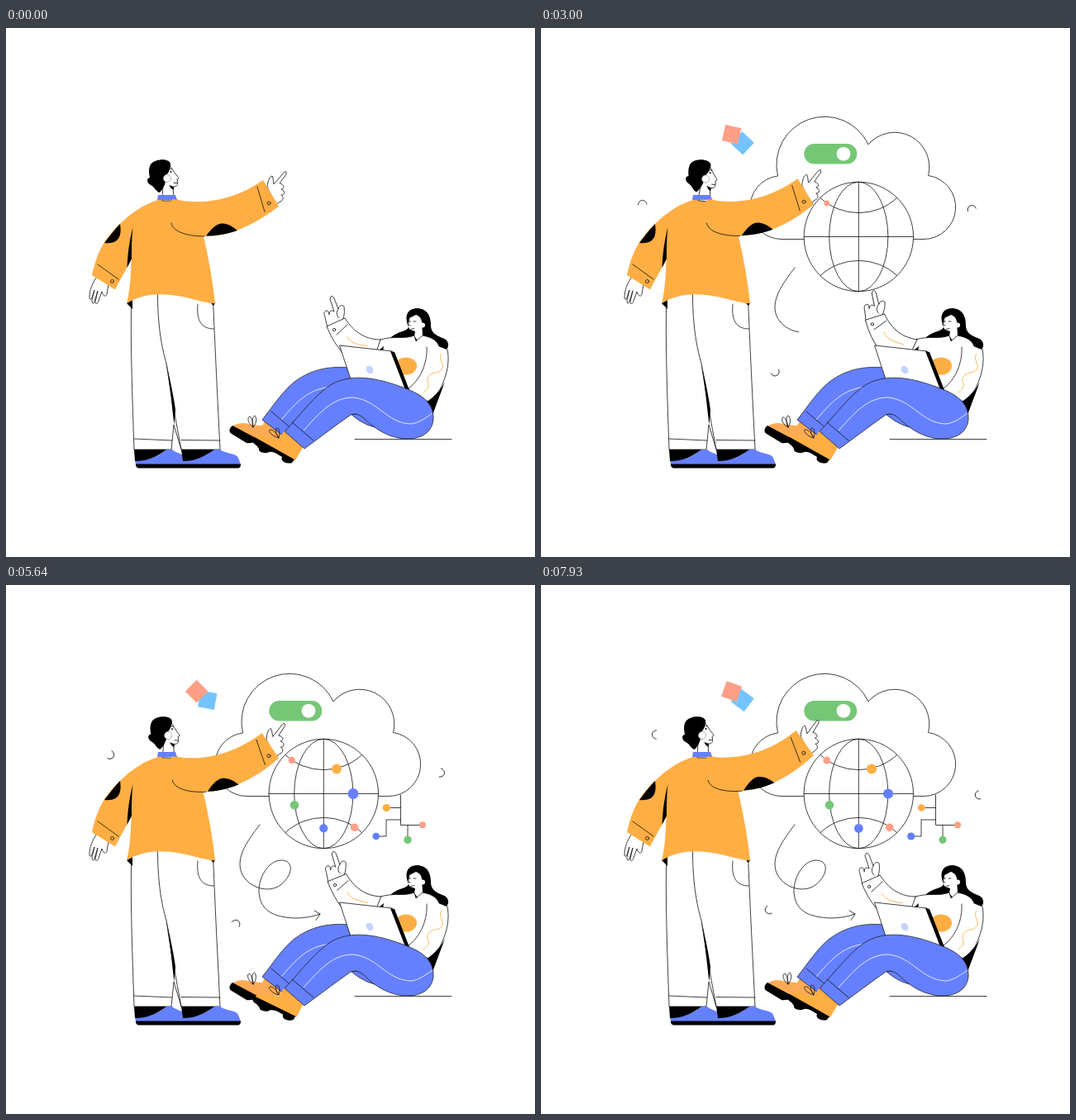
Animation of 640 by 640 pixels, one loop 8 s. Source, as an HTML page:

```html
<!DOCTYPE html>
<html lang="en">
<head>
<meta charset="utf-8">
<title>Cloud teamwork</title>
<style>
html, body { margin: 0; width: 100%; height: 100%; overflow: hidden; background: #fff; }
svg { display: block; width: 100%; height: 100%; }
.line { fill: none; stroke: #111; stroke-width: .8; stroke-linecap: round; stroke-linejoin: round; }
.skin { fill: #fff; stroke: #111; stroke-width: .8; stroke-linejoin: round; }
.orange { fill: #ffae43; }
.peach { fill: #ffab55; }
.blue { fill: #6580ff; }
.jeans { fill: #6580ff; stroke: #111; stroke-width: .7; }
.white { fill: none; stroke: #fff; stroke-width: .8; }
.thread { fill: none; stroke: #ffae43; stroke-width: .9; }
.draw { stroke-dasharray: 1 2; }
</style>
</head>
<body>
<svg viewBox="0 0 640 640">
  <g id="cloud">
    <path class="skin" d="M291 255.5A38.4 38.4 0 0 1 286.5 179A58.25 58.25 0 0 1 396 141A41.9 41.9 0 0 1 468.5 178.5A38.7 38.7 0 0 1 463 255.5Z"/>
  </g>
  <g id="toggle">
    <rect id="track" x="318.3" y="140" width="64" height="24.5" rx="12.25"/>
    <circle id="knob" cy="152.3" r="8.4" fill="#fff"/>
  </g>
  <g id="network"></g>
  <g id="globe">
    <circle class="skin" cx="384.3" cy="252.5" r="66.2"/>
    <path class="line" d="M384.3 186.3V318.7M318.1 252.5H450.5M338 205.5A67.8 67.8 0 0 0 430.6 205.5M338 299.5A67.8 67.8 0 0 1 430.6 299.5"/>
    <ellipse class="line" cx="384.3" cy="252.5" rx="35.6" ry="66.2"/>
  </g>
  <g id="dots"></g>
  <g id="squiggle"></g>
  <g id="rings"></g>
  <rect id="skySquare" x="-10" y="-10" width="20" height="20" fill="#74c4ff"/>
  <rect id="pinkSquare" x="-9.8" y="-9.8" width="19.6" height="19.6" fill="#ff9f88"/>

  <g id="man">
    <path class="skin" d="M152 316C150 380 153 450 155 510H200L203 480 212 510H259C256 450 253 390 250 316Z"/>
    <path class="line" d="M183.5 315C183 358 188 385 194 406C199 440 206 478 212 510M155 497L201 499M212 498.5L259 499M232 334C230 355 237 364 251.5 364"/>
    <path d="M194 404C198 425 203 445 205 462L203.5 480C201 460 198 430 194 404ZM146 333L153 329V340ZM248 333L253.5 332 251 336Z"/>
    <path class="blue" d="M156 523C172 524 185 518 194 510H201C207 515 214 515 220 520V528H157ZM213 523C230 524 242 518 251 510H259C268 516 278 514 281 520L284 528H213Z"/>
    <path d="M155 510H194C184 518 172 524 156 524ZM212 510H252C241 518 230 524 214 524ZM157 527.5H284C284 531 283 532.5 280 532.5H162C158 532.5 157 531 157 527.5Z"/>
    <path class="skin" d="M110 301C104 309 101 318 101 326C101 329 103 329 104 326L107 317 104 329C104 334 106 334 107 331L111 318 108 331C108 335 111 334 112 330L116 319C117 324 121 326 122 322L124 310Z"/>
    <path class="orange" d="M184 208L206 207 222 212C233 228 237 242 239 252C245 278 250 305 253 333.5C236 332 220 325 200 323C180 321 163 323 146 333C150 318 151 299 151.5 281C145 292 139 303 132 316.5L104 299C110 270 121 252 139 236C150 225 165 214 184 208Z"/>
    <path d="M153.5 241C149 258 147 275 146.5 290L152 279C152 265 152 255 153.5 241ZM138 237C140 250 138 262 119 260C126 251 132 243 138 237Z"/>
    <path class="line" d="M111 286L136 304"/><circle class="line" cx="128.5" cy="306.5" r="2"/>
    <g id="manHead">
      <path class="skin" d="M189 209L190 188 197 165C201 170 203 174 207 179Q210.500 182 207 183L207.500 187C208 191 205 192.500 202 192L203 209Z"/>
      <path d="M199 164C197 157 180 158 175 165C172 170 173 176 174 181C169 182 171 188 175 190C180 192 181 198 186 199C190 195 192 190 193 186L192 178C196 178 198 172 199 167ZM197 190L203 192 202.500 196Q199 194 197 190Z"/>
      <circle cx="195" cy="182" r="4.600" fill="#fff" stroke="#999" stroke-width=".7"/>
      <path class="line" d="M203 187.500H207M197.500 171Q199.500 169.500 201 171"/>
      <circle cx="199.500" cy="174" r="1"/>
    </g>
    <path class="blue" d="M184 202H205L207 208H183Z"/>
    <g id="manArm">
      <path class="skin" d="M316 192C317 184 319 180 322 179C324 183 323 186 324 189L336 175Q340 171.5 339 177L331 188C336 189 338 194 333 195C338 197 338 202 333 202C336 205 336 208 332 210L326 214Z"/>
      <path class="orange" d="M202 207C236 215 275 209 311 184L330 215.5C303 237 272 252 240 252C215 251 202 247 200 236L195 215Z"/>
      <path class="line" d="M200 236C202 247 220 252 240 252M304 192L313 222.5"/>
      <path d="M242 251.5C250 241 256 236 262 236.5C270 237 275 241 280 245C268 249 256 252 242 251.5Z"/>
      <circle class="line" cx="318" cy="212" r="2"/>
    </g>
  </g>

  <g id="woman">
    <path class="line" d="M422 497.5H539"/>
    <path d="M464 376C474 366 484 368 487 362C482 350 484 339 498 339C512 340 514 352 514 360C514 368 520 372 528 375C538 378 536 389 531 389L516 388 500 378Z"/>
    <path fill="#fff" d="M488 351C486 356 486 362 489 365L495 367 494 373 499 379 504 372 503 355C502 350 499 348 496 347Z"/>
    <path class="line" d="M488 351L486.5 359 489 360M490 364.5L494 363.5M487 355H489.5M493 355H496"/>
    <circle cx="504" cy="359.5" r="3" fill="#fff"/>
    <path class="skin" d="M446 392L453 377C470 372 481 377 494 372L496 379 504 372C514 374 521 377 524 385L534 389C538 410 530 432 516 452L500 450 450 410Z"/>
    <path d="M531 428L516 468 507 454C518 446 526 438 531 428ZM450 391L457 385 456 392Z"/>
    <path class="line" d="M509 386C510 405 502 425 487 436"/>
    <path class="thread" d="M527 394C521 402 535 408 524 416C510 418 508 424 511 430C512 436 508 438 505 441"/>
    <ellipse class="orange" cx="484" cy="409" rx="13" ry="10.5"/>
    <g id="womanArm">
      <path class="skin" d="M389 363L386 350C384 345 385 342 388 342C390 342 391 344 391 347C391 342 394 341 397 343L392 328Q393 321 397 327L402 340C403 336 407 334 409 337C410 345 409 349 407 354Z"/>
      <path class="line" d="M402 340C399 344 400 349 403 351"/>
      <path fill="#fff" d="M388 361L410 351C422 370 437 377 453 377L449 396 408 394C398 380 392 370 388 361Z"/>
      <path class="line" d="M453 377C437 377 422 370 410 351L388 361C392 370 396 380 408 394M400 371L413 359M453 377L449 389"/>
      <circle class="line" cx="397" cy="365" r="1.7"/>
      <path class="thread" d="M412 373C418 383 428 383 438 385"/>
    </g>
    <path class="peach" d="M274 482C280 477 290 477 296 480L310 481 314 474 336 491 318 506Z"/>
    <path d="M274 481C270 484 269 489 273 491L291 502C295 503 300 500 304 504L320 513 319 505Z"/>
    <g id="laces"><path class="line" d="M299 483C293 479 291 471 295 470C298 472 299 478 299 483C297 477 298 470 301 469C304 472 303 479 299 483"/></g>
    <path class="jeans" d="M425 412C390 407 368 414 349 428C334 440 322 459 310 474L340 497 400 445 425 430Z"/>
    <path class="line" d="M321 464L347 486"/>
    <path class="white" d="M333 474C355 448 370 434 400 434"/>
    <g id="shoe">
      <path class="orange" d="M301 496C305 492 312 492 318 495L330 497 337 487 360 506 350 523Z"/>
      <path d="M300 494.5C296 499 299 503 303 505L306 509C305 514 316 515 318 513C325 512 330 517 334 519C331 525 342 528 346 526L349 522Z"/>
    </g>
    <path class="line" d="M330 496C322 494 317 488 319 486C323 485 328 491 330 496C326 491 325 484 328 484C332 485 331 492 330 496"/>
    <path class="skin" d="M403.5 384L467 391 484 438 417 425Z"/>
    <path d="M465 391L470 392 488 438 484 440Z"/>
    <ellipse cx="440" cy="413.5" rx="4" ry="5.2" transform="rotate(-35 440 413.5)" fill="#c7d3ff"/>
    <path class="jeans" d="M417 467C432 480 445 484 456 484L436 468Z"/>
    <path class="jeans" d="M337 488C353 472 374 443 394 431C422 416 455 425 486 437C508 446 518 457 517 474C515 491 500 497 486 497C465 497 447 486 433 472C427 467 422 466 417 468C400 480 380 495 361 509Z"/>
    <path class="line" d="M346 477L372 499"/>
    <path class="white" d="M360 487C380 465 395 447 420 447C450 450 460 478 490 479C500 478 510 470 516 466"/>
  </g>
</svg>
<script>
const LOOP = 8000;
const COLORS = { orange: '#ffae43', blue: '#6580ff', pink: '#ff9f88', green: '#75c776' };
const start = performance.now();
const $ = id => document.getElementById(id);
const set = (node, attrs) => { for (const key in attrs) node.setAttribute(key, attrs[key]); };

function add(parent, tag, attrs) {
  const node = document.createElementNS('http://www.w3.org/2000/svg', tag);
  set(node, attrs);
  return $(parent).appendChild(node);
}

const span = (t, from, to) => Math.min(1, Math.max(0, (t - from) / (to - from)));
const smooth = p => p * p * (3 - 2 * p);
const easeOut = p => 1 - (1 - p) ** 3;
const backOut = p => 1 + 2.7 * (p - 1) ** 3 + 1.7 * (p - 1) ** 2;

// Keys are [time, ...values]; returns the values at time t.
function track(keys, t, ease = p => p) {
  let i = 0;
  while (i < keys.length - 2 && t > keys[i + 1][0]) i++;
  const [a, b] = [keys[i], keys[i + 1]];
  const p = ease(span(t, a[0], b[0]));
  return a.slice(1).map((v, k) => v + (b[k + 1] - v) * p);
}

const turn = (id, angle, x, y) => set($(id), { transform: `rotate(${angle} ${x} ${y})` });
const grow = (id, scale, x, y) =>
  set($(id), { transform: `translate(${x} ${y}) scale(${scale}) translate(${-x} ${-y})` });

// Strokes that draw themselves: parent, path, start, end
const strokes = [
  ['squiggle', 'M307 290C290 312 283 325 283 338C283 362 314 376 332 363C348 350 348 334 334 333C318 332 305 354 306 372C308 398 330 402 350 403C362 403 372 401 380 398', 2.6, 3.83],
  ['squiggle', 'M373 394L380 398 375 405.5', 3.83, 4.1],
  ['network', 'M477.5 254V290.5H504', 3.1, 4.15],
  ['network', 'M477.5 269.5H460', 3.45, 3.76],
  ['network', 'M477.5 284H460V304H447.5', 3.62, 4.35],
  ['network', 'M486 290.5V308', 3.9, 4.25]
].map(([parent, d, from, to]) => ({
  from, to, node: add(parent, 'path', { d, class: 'line draw', pathLength: 1 })
}));

// x, y, radius, colour, appearance time
const dots = [
  ['dots', 345.7, 212, 4.5, 'pink', 2.9],
  ['dots', 400, 222.5, 5.7, 'orange', 3],
  ['dots', 420, 252.5, 6.1, 'blue', 3.1],
  ['dots', 349, 266.3, 5.6, 'green', 3],
  ['dots', 384.3, 294.3, 5.3, 'blue', 3.2],
  ['dots', 421.7, 293.3, 4.5, 'pink', 3.2],
  ['network', 460.3, 269.5, 4.5, 'orange', 3.66],
  ['network', 504, 290.3, 4.3, 'pink', 4.1],
  ['network', 447.7, 304, 4.4, 'blue', 4.25],
  ['network', 486, 308.3, 4.4, 'green', 4.15]
].map(([parent, cx, cy, r, color, from], i) => ({
  r, from, phase: i * 1.7, node: add(parent, 'circle', { cx, cy, fill: COLORS[color] })
}));

const rings = [
  { spin: -90, angle: 176, keys: [[0, 133.5, 189], [2.21, 125, 208], [4.08, 119.7, 220], [4.86, 122.5, 213], [6.43, 129.5, 198], [7.93, 139, 181]] },
  { spin: -90, angle: 160, keys: [[0, 516.5, 254], [1.29, 518, 239], [2.21, 519, 228.5], [4.08, 524, 206.7], [6.43, 526.7, 237.5], [7.93, 530, 254]] },
  { spin: 90, angle: -206, keys: [[0, 289, 402.5], [1.29, 286, 408], [2.21, 283.7, 412], [4.08, 282.5, 422], [4.86, 280, 416], [6.43, 276, 404], [7.93, 276, 393]] }
].map(ring => ({
  ...ring, node: add('rings', 'path', { class: 'line', d: 'M-.5 -5.2A5.2 5.2 0 0 1 -.5 5.2' })
}));

const armKeys = [[0, 0], [1.6, 0], [2.25, -6.3], [2.5, -6.3], [3.4, 2.9], [3.71, 2.9], [4.86, -2.2], [6.43, -3.2], [7.93, -4.4]];

const mix = (a, b, p) => `rgb(${a.map((v, i) => Math.round(v + (b[i] - v) * p))})`;

function place(node, x, y, angle, scale) {
  set(node, { transform: `translate(${x} ${y}) rotate(${angle}) scale(${scale})` });
}

function render(t) {
  const sway = (1 - Math.cos(Math.PI * t)) / 2;
  turn('manHead', 7.2 * sway, 192, 216);
  turn('womanArm', 6.8 * sway, 455, 394);
  turn('laces', -8 * sway, 299, 483);
  turn('manArm', track(armKeys, t, smooth)[0], 205, 211);

  const tap = smooth(span(t, .95, 1.2)) - smooth(span(t, 2.3, 2.57))
            + smooth(span(t, 4.4, 4.7)) - smooth(span(t, 6, 6.3));
  turn('shoe', -3.2 * tap, 345, 497);

  set($('cloud'), { transform: `translate(0 ${-260 * (1 - easeOut(span(t, .05, .9)))})` });
  grow('globe', easeOut(span(t, .9, 1.56)), 384.3, 252.5);
  grow('toggle', easeOut(span(t, 1.6, 2.3)), 350.3, 152.3);
  const on = smooth(span(t, 2.35, 2.9));
  set($('knob'), { cx: 331.8 + 34.2 * on });
  set($('track'), { fill: mix([201, 211, 255], [117, 199, 118], on) });

  const pop = backOut(span(t, .25, .8));
  place($('pinkSquare'), 230.6, 128.7, 13 - 90 * t, pop);
  place($('skySquare'), 243.7, 139.3, 43 + 90 * t, pop);
  for (const { node, keys, angle, spin } of rings) {
    const [x, y] = track(keys, t);
    place(node, x, y, angle + spin * t, easeOut(span(t, .25, .75)));
  }

  for (const { node, from, to } of strokes) {
    const p = span(t, from, to);
    set(node, { 'stroke-dashoffset': 1 - p, visibility: p ? 'visible' : 'hidden' });
  }
  for (const { node, r, from, phase } of dots) {
    const pulse = 1 + .07 * Math.sin(Math.PI * t + phase);
    set(node, { r: Math.max(0, r * pulse * backOut(span(t, from, from + .45))) });
  }
}

function frame() {
  render((performance.now() - start) % LOOP / 1000);
  requestAnimationFrame(frame);
}
frame();
</script>
</body>
</html>
```
